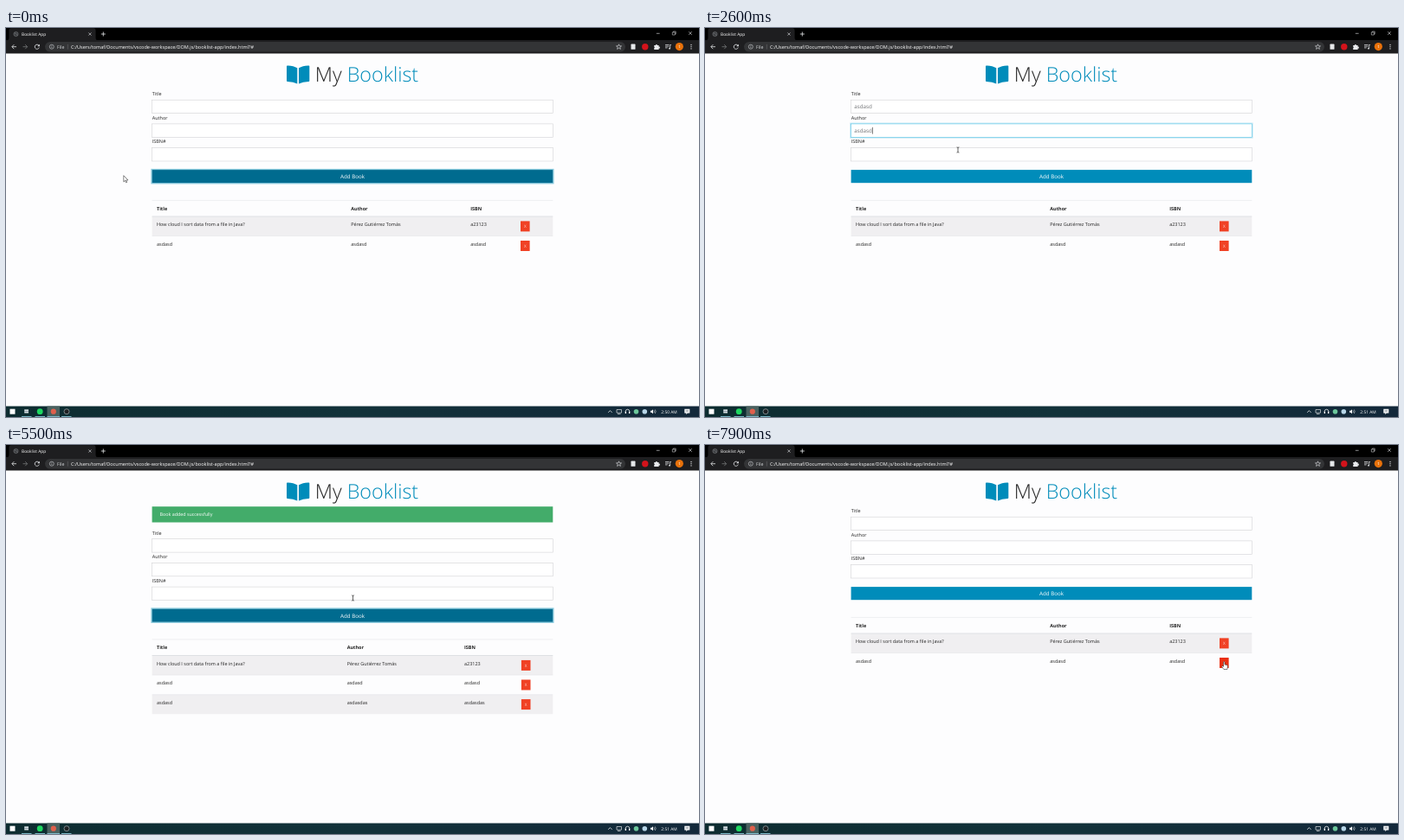
Recreate the animation shown at these times as an HTML page. Size 800 by 450 pixels, loop 8 s.

```html
<!DOCTYPE html>
<html lang="en">
<head>
<meta charset="utf-8">
<title>Booklist App</title>
<style>
html, body { margin: 0; width: 100%; height: 100%; overflow: hidden; background: #fdfdfe; }
svg { display: block; width: 100vw; height: 100vh; font-family: "Open Sans", "Noto Sans", sans-serif; }
text { white-space: pre; text-rendering: geometricPrecision; }
</style>
</head>
<body>
<svg id="stage" viewBox="0 0 800 450" preserveAspectRatio="none"></svg>
<script>
const LOOP = 8000, STEP = 100;
const LEFT = 168.6, WIDTH = 462.7, BLUE = '#008cba';
const FIELD_Y = [83.2, 110.9, 138.6], FIELD_H = 15.4;
const BUTTON_Y = 164.1, BUTTON_H = 15.1;
const SHIFT = 25.5;

const rect = (x, y, w, h, fill, extra = '') =>
  `<rect x="${x}" y="${y}" width="${w}" height="${h}" fill="${fill}" ${extra}/>`;
const circle = (x, y, r, fill, extra = '') =>
  `<circle cx="${x}" cy="${y}" r="${r}" fill="${fill}" ${extra}/>`;
const text = (x, y, size, fill, str, extra = '') =>
  `<text x="${x}" y="${y}" font-size="${size}" fill="${fill}" ${extra}>${str}</text>`;
const line = (d, stroke, w = 0.8, extra = '') =>
  `<path d="${d}" fill="none" stroke="${stroke}" stroke-width="${w}" ${extra}/>`;
const shape = (d, fill, extra = '') => `<path d="${d}" fill="${fill}" ${extra}/>`;

function browserBar() {
  const ink = '#e8eaed', dim = '#77797c';
  return rect(0, 0, 800, 14.5, '#000') +
    rect(0, 14, 800, 15.5, '#1e1e20') +
    shape('M1 14.5Q3.5 14 3.5 11V3Q3.5 .3 6 .3H101Q103.5 .3 103.5 3V11Q103.5 14 106 14.5Z', '#1e1e20') +
    circle(11.5, 7, 2.6, '#3a3c3f', `stroke="${dim}" stroke-width=".6"`) +
    line('M9.5 6Q11.5 5.5 12 7T13.5 8.5', dim, 0.6) +
    text(18, 8.9, 4.85, '#fff', 'Booklist App') +
    line('M95.3 5.4l3.2 3.2m0-3.2l-3.2 3.2', ink, 0.6) +
    line('M109.8 7h5M112.3 4.5v5', ink) +
    line('M750.8 6.3h3.8M788.2 4.3l3.6 3.6m0-3.6l-3.6 3.6', ink, 0.6) +
    line('M769.3 5h3v3h-3zM770.2 5v-1h3v3h-.9', ink, 0.5) +
    rect(45, 16, 670, 11.6, '#333436', 'rx="5.8"') +
    line('M12 21.7H7M9.3 19.2L6.8 21.7L9.3 24.2', ink) +
    line('M19.5 21.7h5M22.2 19.2l2.5 2.5l-2.5 2.5', dim) +
    line('M38 20.3A2.6 2.6 0 1 0 38.3 22.6', ink) + shape('M38.8 18.7v2.5h-2.5z', ink) +
    line('M50.3 21.7a2.5 2.5 0 1 0 5 0a2.5 2.5 0 1 0-5 0M52.8 21.3v1.7M52.8 20v.6', '#d2d5d8', 0.6) +
    text(59, 23.6, 5.3, '#d5d8da', 'File') +
    line('M71.3 18.8v5.8', '#74777b', 0.5) +
    text(75, 23.6, 5.55, '#fff', 'C:/Users/tomaf/Documents/vscode-workspace/DOM.js/booklist-app/index.html?#') +
    line('M707.5 18.8l.8 2 2.2.1-1.7 1.4.6 2.1-1.9-1.2-1.9 1.2.6-2.1-1.7-1.4 2.2-.1z', ink, 0.6) +
    rect(721.5, 18.6, 5, 6.2, '#e6e8ea', 'rx=".6"') +
    circle(737.8, 21.7, 3.7, '#d3131b') +
    shape('M748.2 20h1.7a1 1 0 1 1 2 0h1.7v1.7a1 1 0 1 1 0 1.9v1.3h-5.4v-1.7a1 1 0 0 0 0-1.7z', ink) +
    line('M761 19.5h4.5M761 21.2h4.5M761 22.9h2.7', ink, 0.7) +
    line('M766.7 19.5v4M766.5 19.5h1.5', ink, 0.7) + circle(766, 23.7, 0.9, ink) +
    circle(777.3, 21.6, 4.6, '#e8710a') +
    text(777.3, 23.4, 5, '#fff', 't', 'text-anchor="middle"') +
    [19.5, 21.7, 23.9].map(y => circle(791, y, 0.65, ink)).join('');
}

function taskbar() {
  const ink = '#fff';
  return '<defs><linearGradient id="bar"><stop stop-color="#0d2c30"/><stop offset=".5" stop-color="#12323a"/>' +
    '<stop offset="1" stop-color="#13283a"/></linearGradient></defs>' +
    rect(0, 437.5, 800, 12.5, 'url(#bar)') +
    rect(47.5, 437.5, 14.5, 12.5, '#49615f') +
    rect(4.5, 440.7, 6, 6, '#fff') +
    rect(21.2, 441.3, 4.8, 4.2, '#d5dfe2') + line('M21.2 443.5h4.8', '#456', 0.5) +
    circle(39.2, 443.7, 3.4, '#1ed760') +
    circle(54.8, 443.7, 3.1, '#e0604c') +
    circle(70, 443.7, 3, '#1d2022', 'stroke="#b9c2c4" stroke-width=".6"') +
    [18, 33.5, 64].map(x => rect(x, 449.1, 11.5, 0.9, '#84c3d4')).join('') +
    rect(47.5, 449.1, 14.5, 0.9, '#84c3d4') +
    line('M695.2 444.8l2.2-2.2l2.2 2.2', ink, 0.7) +
    line('M705 441.5h5.5v3.6h-5.5zM706 446.5h3.5', ink, 0.6) +
    line('M715.2 444.5v-1a2.3 2.3 0 0 1 4.6 0v1', ink, 0.7) +
    rect(714.7, 443.7, 1.3, 2.3, ink) + rect(719, 443.7, 1.3, 2.3, ink) +
    circle(727.5, 443.7, 2.8, '#6cc79b') +
    circle(737.3, 443.7, 2.8, '#b7d6e8') +
    shape('M744 442.7h1.3l1.7-1.5v5l-1.7-1.5h-1.3z', ink) +
    line('M748 442.3q1 1.4 0 2.8M749.3 441.4q1.7 2.3 0 4.6', ink, 0.5) +
    shape('M783.3 440.8h6v4.7h-2.5l-1.5 1.5v-1.5h-2z', ink) +
    line('M784.5 442.4h3.6M784.5 443.8h3.6', '#234', 0.4);
}

const heading = () =>
  shape('M336.3 46.3Q331.5 43.2 324.8 43.4Q324 43.5 324 44.3V61Q324 61.9 324.9 61.9Q331.8 62.2 336.3 64.6Z', BLUE) +
  shape('M338 46.3Q342.8 43.2 349.5 43.4Q350.3 43.5 350.3 44.3V61Q350.3 61.9 349.4 61.9Q342.5 62.2 338 64.6Z', BLUE) +
  text(356.8, 62.4, 23.33, '#222', `My <tspan fill="${BLUE}">Booklist</tspan>`, 'font-weight="300"');

const SUGGESTIONS = [
  'How cloud I sort data from a file in Java?',
  'There\'s no "Include interface callbacks?" in Android Studio',
  'asdas',
  'There\'s no Include interface callbacks?" in Android Studio',
  'Why Android Studio is creating two fragments?',
  'Técnico en reparación de dispivos Velmo en Lisboa.'
];

function dropdown(typed) {
  const items = SUGGESTIONS.filter(s => s.startsWith(typed));
  if (!items.length) return '';
  return rect(LEFT, 99, 160, items.length * 15 + 7, '#23282b', 'rx="1.2"') +
    items.map((s, i) => text(174, 112 + i * 15, 5.13, '#fff', s, 'font-weight="600"')).join('');
}

const pen = document.createElement('canvas').getContext('2d');
function textWidth(str) {
  pen.font = '100px "Open Sans", "Noto Sans", sans-serif';
  return pen.measureText(str).width * 0.0625;
}

function field(label, y, value, focused, caret) {
  const ring = focused ? rect(LEFT - 0.8, y - 0.8, WIDTH + 1.6, FIELD_H + 1.6, 'none',
    'stroke="#bfe5f2" stroke-width="1"') : '';
  return text(LEFT + 0.2, y - 5.2, 5.47, '#222', label) + ring +
    rect(LEFT, y, WIDTH, FIELD_H, '#fff', `stroke="${focused ? '#4cc0e4' : '#d3d3d5'}" stroke-width=".6"`) +
    text(172.3, y + 10, 6.25, '#707275', value) +
    (caret ? rect(172.5 + textWidth(value), y + 3.9, 0.6, 7.8, '#333') : '');
}

function addButton(dark, ring) {
  return (ring ? rect(LEFT - 0.6, BUTTON_Y - 0.6, WIDTH + 1.2, BUTTON_H + 1.2, 'none',
      'stroke="#8accdf" stroke-width="1.25"') : '') +
    rect(LEFT, BUTTON_Y, WIDTH, BUTTON_H, dark ? '#006b8f' : BLUE) +
    text(400, 174, 6.2, '#fff', 'Add Book', 'text-anchor="middle"');
}

function table(rows, cols, hoverRow) {
  const rule = (y, w) => line(`M${LEFT} ${y}h${WIDTH}`, '#dcdee1', w);
  const cells = (list, y, extra) => list.map((s, i) => text(cols[i], y, 5.47, '#222', s, extra)).join('');
  return rule(199.4, 0.5) + cells(['Title', 'Author', 'ISBN'], 210.5, 'font-weight="700"') +
    rows.map((row, i) => {
      const y = 218 + i * 22.6;
      return (i % 2 ? '' : rect(LEFT, y, WIDTH, 22.6, '#f0eff1')) + rule(y, i ? 0.4 : 0.9) +
        cells(row, y + 11) +
        rect(cols[3], y + 5.4, 10.6, 12, i === hoverRow ? '#ea2f10' : '#f04124') +
        text(cols[3] + 5.3, y + 13.1, 4.7, '#ffdcd5', 'X', 'text-anchor="middle"');
    }).join('');
}

const POINTERS = {
  arrow: shape('M0 0V7.2L1.7 5.7L2.8 8.2L3.9 7.7L2.8 5.3H5.1Z', '#fff', 'stroke="#222" stroke-width=".55"'),
  beam: line('M-1.4 -3.1Q0 -3.1 0 -2.4V2.4Q0 3.1 -1.4 3.1M1.4 -3.1Q0 -3.1 0 -2.4M0 2.4Q0 3.1 1.4 3.1', '#222', 0.7),
  hand: shape('M-.7 0Q0 -.9 .7 0V3L3.2 3.5Q4.2 3.8 4.1 5L3.6 8.5H-.4L-2.7 5.4Q-2.6 4.4 -1.6 4.7L-.7 5.3Z',
    '#fff', 'stroke="#222" stroke-width=".55"')
};

// time, x, y
const PATH = [
  [400, 135.8, 170.7], [900, 197.6, 97], [1900, 197.6, 97], [2200, 291, 119], [2400, 291.5, 120],
  [2600, 292, 141], [3000, 292, 145], [3200, 292, 145], [3600, 385.7, 156], [3800, 400.5, 175],
  [4000, 400.5, 177], [5500, 400.5, 177], [6200, 594, 286], [6400, 598, 295], [7300, 598, 295], [7800, 599.3, 251]
];

function pointerAt(t) {
  const n = PATH.findIndex(p => p[0] > t);
  if (n < 0) return PATH[PATH.length - 1].slice(1);
  if (n === 0) return PATH[0].slice(1);
  const [t0, x0, y0] = PATH[n - 1], [t1, x1, y1] = PATH[n];
  const k = (t - t0) / (t1 - t0), e = k * k * (3 - 2 * k);
  return [x0 + (x1 - x0) * e, y0 + (y1 - y0) * e];
}

const FIELDS = [
  { label: 'Title', word: 'asdasd', focus: 900, blur: 2200, type: 1400, pace: 100 },
  { label: 'Author', word: 'asdasdas', focus: 2200, blur: 3100, type: 2300, pace: 60 },
  { label: 'ISBN#', word: 'asdasdas', focus: 3100, blur: 4000, type: 3150, pace: 60 }
];
const ADDED = 4000, REMOVED = 6600, ALERT_END = 7300;

function typedText(f, t) {
  if (t < f.type || t >= ADDED) return '';
  return f.word.slice(0, Math.floor((t - f.type) / f.pace) + 1);
}

function caretOn(f, t) {
  const end = f.type + f.word.length * f.pace;
  const since = t < f.type ? t - f.focus : Math.max(0, t - end);
  return since % 1000 < 500;
}

function scene(t) {
  const alert = t >= ADDED && t < ALERT_END, dy = alert ? SHIFT : 0;
  const extra = t >= ADDED && t < REMOVED;
  const rows = [
    ['How cloud I sort data from a file in Java?', 'Pérez Gutiérrez Tomás', 'a23123'],
    ['asdasd', 'asdasd', 'asdasd']
  ];
  if (extra) rows.push(['asdasd', 'asdasdas', 'asdasdas']);
  const cols = extra ? [174, 393.7, 529, 594.9] : [174, 398.3, 536.2, 594];

  const [x, y] = pointerAt(t), py = y - dy;
  const inside = x >= LEFT && x <= LEFT + WIDTH;
  const onField = inside && FIELD_Y.some(fy => py >= fy && py <= fy + FIELD_H);
  const onAdd = inside && py >= BUTTON_Y && py <= BUTTON_Y + BUTTON_H;
  const hoverRow = x >= cols[3] && x <= cols[3] + 10.6
    ? rows.findIndex((_, i) => Math.abs(py - 229.4 - i * 22.6) <= 6.2) : -1;
  const kind = onField ? 'beam' : onAdd || hoverRow >= 0 ? 'hand' : 'arrow';
  const ring = t < 900 || extra;

  const form = FIELDS.map((f, i) => {
    const focused = t >= f.focus && t < f.blur;
    return field(f.label, FIELD_Y[i], typedText(f, t), focused, focused && caretOn(f, t));
  }).join('');

  return (alert ? rect(LEFT, 71.2, WIDTH, 18.3, '#43ac6a') +
      text(177.6, 82.2, 5.35, '#fff', 'Book added successfully') : '') +
    `<g transform="translate(0 ${dy})">` + form + addButton(ring || onAdd, ring) + table(rows, cols, hoverRow) + '</g>' +
    (t >= 1000 && t < 2200 ? dropdown(typedText(FIELDS[0], t)) : '') +
    text(756.3, 445.5, 4.9, '#fff', t < 1700 ? '2:50 AM' : '2:51 AM') +
    `<g transform="translate(${x} ${y})">${POINTERS[kind]}</g>`;
}

const stage = document.getElementById('stage');
stage.innerHTML = rect(0, 0, 800, 450, '#fdfdfe') + browserBar() + heading() + taskbar() + '<g id="live"></g>';
const live = document.getElementById('live');
const start = performance.now();
let shown = -1;

function update(now) {
  const t = Math.floor((Math.max(0, now - start) % LOOP) / STEP) * STEP;
  if (t !== shown) live.innerHTML = scene(shown = t);
  requestAnimationFrame(update);
}
update(start);
</script>
</body>
</html>
```
